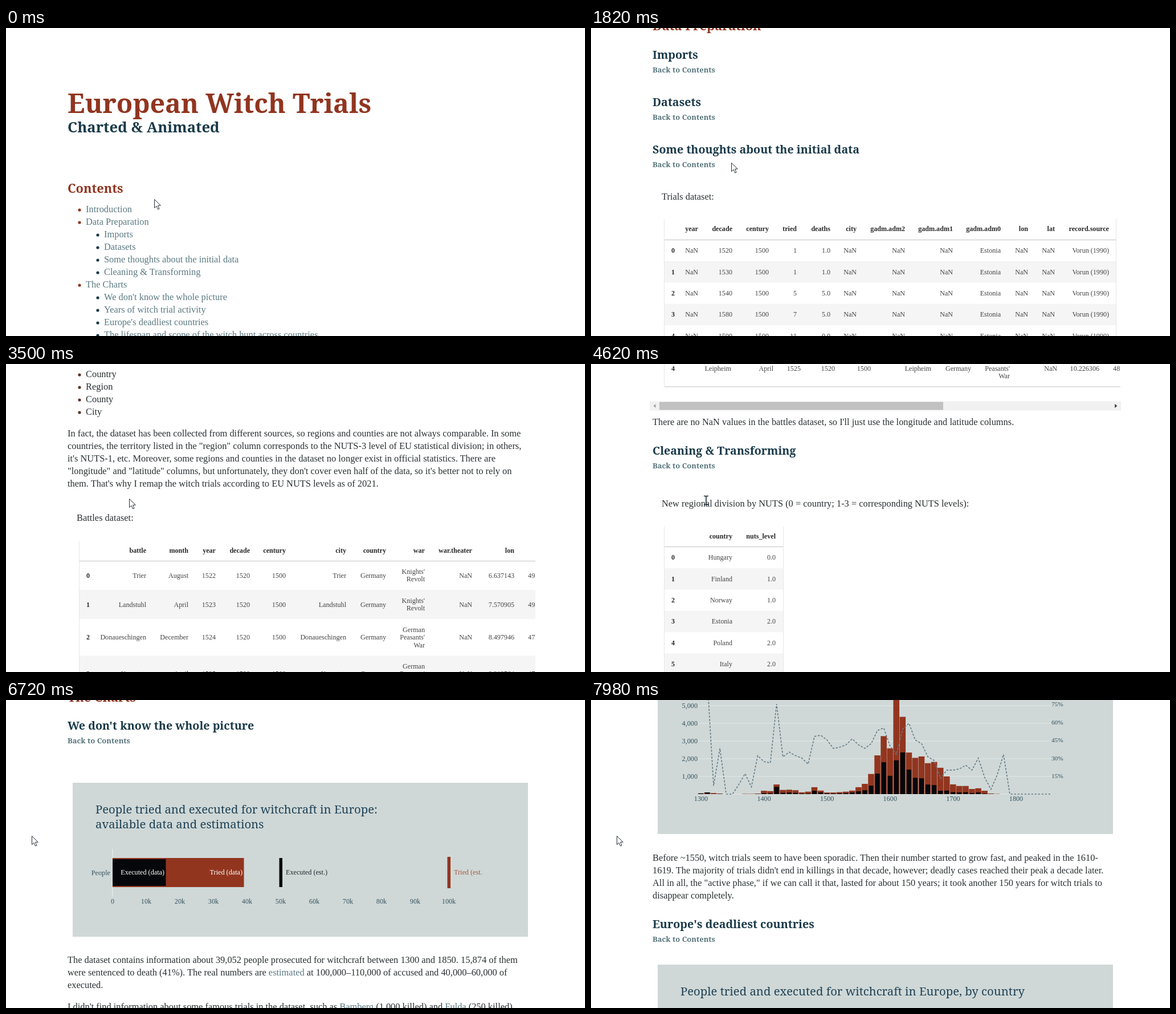
Write an HTML page that moves like this. It is 1016 by 540 pixels and loops after 8 s.

```html
<!DOCTYPE html>
<html lang="en">
<head>
<meta charset="utf-8">
<title>European Witch Trials</title>
<style>
  html, body { margin: 0; width: 100%; height: 100%; overflow: hidden; background: #fff; }
  svg { display: block; width: 1016px; height: 540px; }
  text { font-family: "Liberation Serif", "Times New Roman", serif; font-size: 16.4px; fill: #2a3032; }
  .h1, .sub, .h2, .h3, .back, .chart { font-family: "Noto Serif", serif; font-weight: 700; }
  .h1 { font-size: 46.6px; fill: #913520; }
  .sub { font-size: 25.7px; fill: #1a3a49; }
  .h2 { font-size: 21.8px; fill: #913520; }
  .h3 { font-size: 19.7px; fill: #1a3a49; }
  .back { font-size: 13px; fill: #56747b; }
  .chart { font-size: 20.3px; font-weight: 400; fill: #1f4255; }
  .link { fill: #5a7980; }
  .b { font-weight: 700; fill: #14191b; }
  .cell { font-size: 12.1px; fill: #444; }
  .head { font-size: 12.1px; font-weight: 700; fill: #2a2a2a; }
  .axis { font-size: 12.2px; fill: #36525e; }
</style>
</head>
<body>
<svg viewBox="0 0 1016 540">
  <defs><clipPath id="wide"><rect x="100" y="0" width="829" height="6000"/></clipPath></defs>
  <g id="page"></g>
  <g id="mouse">
    <path id="arrow" d="M.5 .5V15.5L4 12.2L6.5 18L9 17L6.6 11.2H11.3Z" fill="#fff" stroke="#26303a"/>
    <path id="beam" d="M-4 -7.5H-1.2L0 -6.5L1.2 -7.5H4M0 -6.5V6.5M-4 7.5H-1.2L0 6.5L1.2 7.5H4" fill="none" stroke="#1b2b36" stroke-width="1.6"/>
  </g>
</svg>
<script>
const RUST = '#92351f', INK = '#06070b', PANEL = '#cfd8d7', NAVY = '#1a3a49';
const out = [];
const text = (x, y, s, cls = '', anchor = 'start', extra = '') =>
  out.push(`<text x="${x}" y="${y}" class="${cls}" text-anchor="${anchor}" ${extra}>${s}</text>`);
const rect = (x, y, w, h, fill) =>
  out.push(`<rect x="${x}" y="${y}" width="${w}" height="${h}" fill="${fill}"/>`);
const dot = (x, y, fill) => out.push(`<circle cx="${x}" cy="${y}" r="2.6" fill="${fill}"/>`);
const lines = (y, list, cls) => list.forEach((s, i) => text(108, y + 22 * i, s, cls));
const bullets = (y, list) => list.forEach((s, i) => {
  dot(129, y + 22 * i - 4, '#5f3226');
  text(140, y + 22 * i, s);
});
const section = (y, title) => {
  text(108, y, title, 'h3');
  text(108, y + 24, 'Back to Contents', 'back');
};
const scrollbar = (y, end) => {
  rect(103, y - 8, 827, 16, '#f1f1f1');
  rect(120, y - 7, end - 120, 14, '#c1c1c1');
  out.push(`<path d="M113.5 ${y - 3.5}v7l-4 -3.5z" fill="#a0a0a0"/>`,
           `<path d="M919 ${y - 3.5}v7l4.5 -3.5z" fill="#444"/>`);
};

// rows: [height, cells]; a cell may be a list of lines; cols: right edges
function table(top, right, headLine, cols, names, rows) {
  names.forEach((s, i) => text(cols[i + 1], top + 21, s, 'head', 'end'));
  let y = headLine;
  rows.forEach(([h, cells], r) => {
    if (r % 2) rect(129, y, right - 129, h, '#f5f5f5');
    text(cols[0], y + h / 2 + 4, r, 'head', 'end');
    cells.forEach((c, i) => {
      const part = [].concat(c);
      part.forEach((s, k) =>
        text(cols[i + 1], y + h / 2 + 4 + 13.4 * (k - (part.length - 1) / 2), s, 'cell', 'end'));
    });
    y += h;
  });
  rect(129, headLine - .5, right - 129, 1, '#c4c4c4');
  rect(128, top, 1, y - top, '#e6e6e6');
  rect(right, top, 1, y - top, '#e6e6e6');
  rect(129, y - .5, right - 129, 1.5, '#d6d6d6');
}

// Title and contents
text(108, 148.5, 'European Witch Trials', 'h1');
text(108, 183, 'Charted &amp; Animated', 'sub');
text(108, 289, 'Contents', 'h2');
['Introduction', 'Data Preparation', '-Imports', '-Datasets', '-Some thoughts about the initial data',
 '-Cleaning &amp; Transforming', 'The Charts', "-We don't know the whole picture",
 '-Years of witch trial activity', "-Europe's deadliest countries",
 '-The lifespan and scope of the witch hunt across countries', '-Witch trials on the map',
 'Conclusion'].forEach((s, i) => {
  const sub = s[0] === '-', y = 323 + 22 * i;
  dot(sub ? 161 : 129, y - 4, sub ? NAVY : RUST);
  text(sub ? 172 : 140, y, sub ? s.slice(1) : s, 'link');
});

text(108, 684, 'Introduction', 'h2');
text(108, 708, 'Back to Contents', 'back');
lines(756, [
  'For several centuries, people across Europe were accused of witchcraft, and many were put to death.',
  'The records of those trials are scattered and incomplete, but they can still tell us a lot.']);
lines(816, [
  'In this notebook, I look at when and where the trials took place, how many people were tried, and',
  'how often the trials ended in executions.']);

// Data preparation
text(108, 1004, 'Data Preparation', 'h2');
section(1054, 'Imports');
section(1137, 'Datasets');
section(1220, 'Some thoughts about the initial data');
text(124, 1301, 'Trials dataset:');
const trial = (decade, tried, deaths) =>
  [37.4, ['NaN', decade, 1500, tried, deaths, 'NaN', 'NaN', 'NaN', 'Estonia', 'NaN', 'NaN', 'Vorun (1990)']];
table(1335, 921, 1371.5, [147, 188, 248, 312, 361, 420, 466, 551, 635, 719, 767, 814, 909],
  ['year', 'decade', 'century', 'tried', 'deaths', 'city', 'gadm.adm2', 'gadm.adm1', 'gadm.adm0', 'lon', 'lat', 'record.source'],
  [trial(1520, 1, '1.0'), trial(1530, 1, '1.0'), trial(1540, 5, '5.0'), trial(1580, 7, '5.0'), trial(1590, 11, '0.0')]);
scrollbar(1592.5, 908);

lines(1627, ['1. The exploration will be based on decades.'], 'b');
lines(1665, ['There are three time intervals in the dataset:']);
bullets(1703, ['Century', 'Decade', 'Year']);
lines(1785, ['But the "Year" column has 9% of NaN values, while the "Decade" has none, so I\'ll use the latter.']);
lines(1824, ['2. To be put on a map with the help of EU GeoJSON data, the regional structure of the dataset needs to be', 'transformed.'], 'b');
lines(1884, ['In the original dataset, the territory is divided by:']);
bullets(1923, ['Country', 'Region', 'County', 'City']);
lines(2027, [
  'In fact, the dataset has been collected from different sources, so regions and counties are not always comparable. In some',
  'countries, the territory listed in the "region" column corresponds to the NUTS-3 level of EU statistical division; in others,',
  "it's NUTS-1, etc. Moreover, some regions and counties in the dataset no longer exist in official statistics. There are",
  '"longitude" and "latitude" columns, but unfortunately, they don\'t cover even half of the data, so it\'s better not to rely on',
  "them. That's why I remap the witch trials according to EU NUTS levels as of 2021."]);

text(124, 2175, 'Battles dataset:');
out.push('<g clip-path="url(#wide)">');
const revolt = ["Knights'", 'Revolt'], peasants = ['German', "Peasants'", 'War'];
const battle = (h, place, month, year, war, lon, lat) =>
  [h, [place, month, year, 1520, 1500, place, 'Germany', war, 'NaN', lon, lat]];
table(2210, 980, 2245.5, [147, 246, 320, 368, 428, 491, 597, 667, 735, 818, 892, 967.5],
  ['battle', 'month', 'year', 'decade', 'century', 'city', 'country', 'war', 'war.theater', 'lon', 'lat'],
  [battle(50.5, 'Trier', 'August', 1522, revolt, '6.637143', '49.749992'),
   battle(51, 'Landstuhl', 'April', 1523, revolt, '7.570905', '49.412483'),
   battle(64.2, 'Donaueschingen', 'December', 1524, peasants, '8.497946', '47.953189'),
   battle(64.2, 'Kempten', 'April', 1525, peasants, '9.913764', '47.726745'),
   battle(64.2, 'Leipheim', 'April', 1525, peasants, '10.226306', '48.449821')]);
out.push('</g>');
scrollbar(2573.5, 618);
lines(2607, ["There are no NaN values in the battles dataset, so I'll just use the longitude and latitude columns."]);

section(2659, 'Cleaning &amp; Transforming');
text(124, 2750, 'New regional division by NUTS (0 = country; 1-3 = corresponding NUTS levels):');
table(2785, 337, 2820.5, [147, 248, 324], ['country', 'nuts_level'],
  [['Hungary', 0], ['Finland', 1], ['Norway', 1], ['Estonia', 2], ['Poland', 2], ['Italy', 2],
   ['Spain', 2], ['France', 2], ['Denmark', 3], ['Germany', 3]].map(([c, n]) => [37.4, [c, n + '.0']]));
lines(3255, [
  'The level differs from country to country, because the sources describe the territory in different detail. Where',
  'the exact region is unknown, I keep the trial in the country totals and leave it out of the regional maps.']);
lines(3315, [
  'The names of the regions are then matched with the EU GeoJSON data, and the trials are summed up by decade.']);

// Charts
text(108, 3503, 'The Charts', 'h2');
section(3552, "We don't know the whole picture");
rect(117, 3645, 799, 270, PANEL);
text(157, 3699, 'People tried and executed for witchcraft in Europe:', 'chart');
text(157, 3725, 'available data and estimations', 'chart');
rect(186.5, 3761, 1, 84, '#edf1f0');
rect(187, 3777, 230.5, 51, RUST);
rect(187, 3779, 93.5, 47, INK);
rect(479.5, 3777, 5.5, 51, INK);
rect(774.5, 3775, 5.5, 55, RUST);
text(183, 3806.5, 'People', 'axis', 'end');
text(278, 3806, 'Executed (data)', 'axis', 'end', 'style="fill:#fff"');
text(415, 3806, 'Tried (data)', 'axis', 'end', 'style="fill:#fff"');
text(491, 3806, 'Executed (est.)', 'axis', 'start', 'style="fill:#20262a"');
text(786, 3806, 'Tried (est.', 'axis', 'start', 'style="fill:#a5593f"');
for (let i = 0; i <= 10; i++) text(187 + 59 * i, 3857, i ? i * 10 + 'k' : 0, 'axis', 'middle');

const link = s => `<tspan class="link">${s}</tspan>`;
lines(3961, [
  'The dataset contains information about 39,052 people prosecuted for witchcraft between 1300 and 1850. 15,874 of them',
  `were sentenced to death (41%). The real numbers are ${link('estimated')} at 100,000–110,000 of accused and 40,000–60,000 of`,
  'executed.']);
lines(4043, [
  `I didn't find information about some famous trials in the dataset, such as ${link('Bamberg')} (1,000 killed) and ${link('Fulda')} (250 killed)`,
  'trials, so the numbers below are not complete.']);

section(4131, 'Years of witch trial activity');
rect(117, 4195, 799, 440, PANEL);
text(157, 4248, 'People tried and executed for witchcraft in Europe, by decade', 'chart');
const tried = [40, 100, 60, 30, 0, 0, 0, 15, 15, 30, 190, 170, 545, 235, 250, 220, 100, 140, 390, 200,
  90, 90, 110, 140, 200, 390, 580, 1140, 2190, 3280, 2590, 5800, 4370, 2350, 2050, 2130, 1750, 1820,
  1490, 1000, 550, 460, 460, 290, 330, 190, 35, 12];
const rate = [100, 95, 7, 38, 0, 0, 8, 17, 6, 32, 27, 26, 75, 31, 35, 32, 30, 25, 48, 49, 45, 38, 39,
  41, 46, 41, 38, 42, 53, 55, 40, 33, 54, 59, 45, 42, 31, 28, 13, 20, 20, 21, 24, 20, 30, 14, 4, 16, 33];
const zero = 4565, step = 11.06;
const decadeX = i => 193 + step * i;
for (let i = 0; i <= 6; i++) {
  rect(188, zero - 31 * i - .5, 620, 1, '#e4eae9');
  if (i) {
    text(187, zero - 31 * i + 4, i + ',000', 'axis', 'end');
    text(808, zero - 31.6 * i + 4, i * 15 + '%', 'axis', 'start', 'style="font-size:11.2px"');
  }
}
tried.forEach((n, i) => {
  const h = n * .031, dead = h * rate[i] / 100, x = decadeX(i);
  if (!n) return;
  rect(x - 5.4, zero - h, 10.6, h, RUST);
  rect(x - 4.2, zero - dead, 8.2, dead, INK);
});
const curve = Array.from({ length: 57 }, (_, i) =>
  `${Math.min(808, decadeX(i)).toFixed(1)},${(zero - 2.107 * (rate[i] || 0)).toFixed(1)}`);
out.push(`<polyline points="${curve.join(' ')}" fill="none" stroke="#647a85" stroke-width="1.6" stroke-dasharray="3.5 2.5"/>`);
for (let i = 0; i <= 5; i++) text(decadeX(i * 10), zero + 12, 1300 + 100 * i, 'axis', 'middle');

lines(4682, [
  'Before ~1550, witch trials seem to have been sporadic. Then their number started to grow fast, and peaked in the 1610-',
  "1619. The majority of trials didn't end in killings in that decade, however; deadly cases reached their peak a decade later.",
  'All in all, the "active phase," if we can call it that, lasted for about 150 years; it took another 150 years for witch trials to',
  'disappear completely.']);
section(4800, "Europe's deadliest countries");
rect(117, 4864, 799, 400, PANEL);
text(157, 4918, 'People tried and executed for witchcraft in Europe, by country', 'chart');

const page = document.getElementById('page');
page.innerHTML = out.join('');

// [time, value...] with straight motion between the keys
const scrollKeys = [[0, 0], [980, 0], [1820, 1000], [2660, 1400], [2800, 1400], [3500, 1900], [4620, 2500],
  [5040, 2560], [5320, 2700], [5460, 2700], [5880, 3000], [6020, 3000], [6720, 3500], [7280, 4000],
  [7420, 4000], [7980, 4400]];
const mouseKeys = [[0, 260, 300], [560, 250, 238], [980, 250, 238], [1820, 246, 236], [2660, 234, 234],
  [2800, 234, 234], [3500, 216, 236], [4620, 202, 239], [5320, 194, 238], [6020, 194, 238],
  [6440, 45, 238], [7980, 45, 238]];

function at(keys, t) {
  const i = keys.findIndex(k => k[0] >= t);
  if (i < 1) return keys[i ? keys.length - 1 : 0].slice(1);
  const a = keys[i - 1], b = keys[i], p = (t - a[0]) / (b[0] - a[0]);
  return a.slice(1).map((v, j) => Math.round(v + (b[j + 1] - v) * p));
}

const mouse = document.getElementById('mouse');
const arrow = document.getElementById('arrow');
const beam = document.getElementById('beam');
const LOOP = 8000, TICK = 140;

function draw() {
  const t = Math.floor(performance.now() % LOOP / TICK) * TICK;
  const [x, y] = at(mouseKeys, t);
  page.setAttribute('transform', `translate(0 ${-at(scrollKeys, t)[0]})`);
  mouse.setAttribute('transform', `translate(${x} ${y})`);
  const typing = t >= 4480 && t < 5180;
  arrow.style.display = typing ? 'none' : '';
  beam.style.display = typing ? '' : 'none';
  requestAnimationFrame(draw);
}
draw();
</script>
</body>
</html>
```
